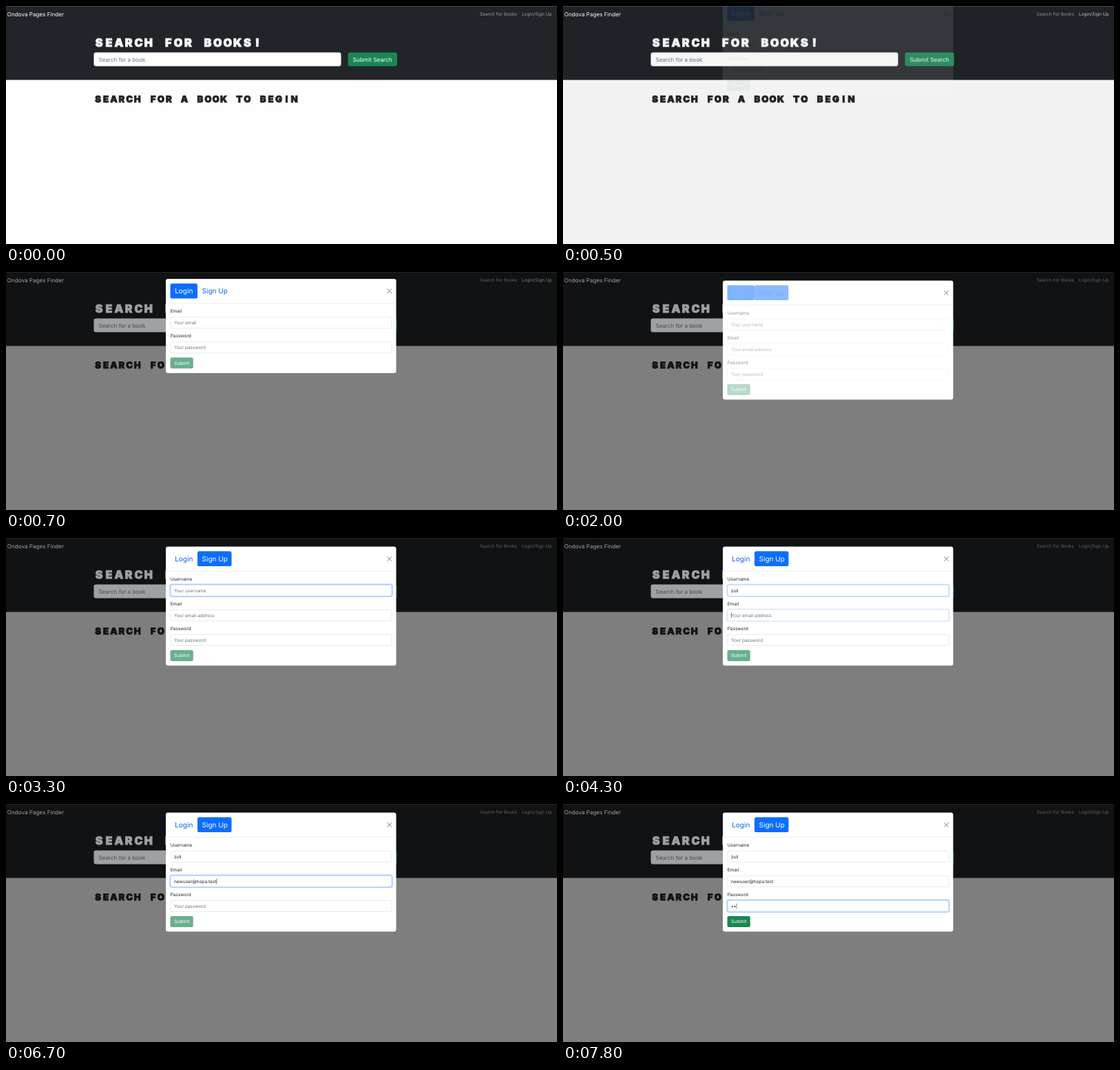
Animation, 800 px wide and 346 px high, one loop 8 s. Source, as an HTML page:

```html
<!DOCTYPE html>
<html lang="en">
<head>
<meta charset="utf-8">
<title>Book search</title>
<style>
html, body { margin: 0; width: 100%; height: 100%; overflow: hidden; background: #fefefe; }
svg { display: block; width: 100vw; height: 100vh; }
text { font-family: Inter, Roboto, sans-serif; font-size: 6.5px; fill: #212529; text-rendering: geometricPrecision; }
.big { font-size: 8.1px; }
.button { font-size: 8.3px; fill: #fff; }
.link { fill: #fff; }
.tab { font-size: 10px; }
.hint { fill: #6c757d; }
.head { font-weight: 900; text-anchor: middle; stroke-width: .8px; }
.h1 { font-size: 16.2px; fill: #fff; stroke: #fff; }
.h2 { font-size: 13.2px; stroke: #212529; }
</style>
</head>
<body>
<svg viewBox="0 0 800 346">
  <rect width="800" height="346" fill="#fefefe"/>
  <rect width="800" height="107.5" fill="#212529"/>
  <rect width="800" height=".7" fill="#54585c"/>
  <rect x="496.5" y="67.5" width="71.5" height="20" rx="3.2" fill="#198754"/>
  <text class="button" x="503.5" y="80.6">Submit Search</text>
  <text class="head h2" data-pitch="11.4" y="140">SEARCH FOR A BOOK TO BEGIN</text>
  <rect id="backdrop" width="800" height="346"/>
  <g id="lit">
    <text class="big link" x="1.8" y="15.1">Ondova Pages Finder</text>
    <text class="link" x="687.8" y="14.4" fill-opacity=".55">Search For Books</text>
    <text class="link" id="account" x="749" y="14.4">Login/Sign Up</text>
    <text class="head h1" data-pitch="14.35" y="58.8">SEARCH FOR BOOKS!</text>
    <rect x="127.5" y="67.5" width="359" height="20" rx="3.2" fill="#fff"/>
    <text class="big hint" x="134.5" y="80.5">Search for a book</text>
  </g>
  <g id="modal">
    <rect id="box" x="232" y="12.5" width="334.5" rx="3.3" fill="#fff"/>
    <path d="M232 48H566.5" stroke="#dee2e6" stroke-width=".6"/>
    <rect id="loginPill" x="238.5" y="19.3" width="39.5" height="21.7" rx="2.6" fill="#0d6efd"/>
    <rect id="signPill" x="278" y="19.3" width="49.5" height="21.7" rx="2.6" fill="#0d6efd"/>
    <text class="tab" id="loginTab" x="245.2" y="33.7">Login</text>
    <text class="tab" id="signTab" x="284.6" y="33.7">Sign Up</text>
    <path d="M553.4 27l6.4 6.4m0-6.4l-6.4 6.4" stroke="#777" stroke-width="1"/>
    <g id="loginPane"></g>
    <g id="signPane"></g>
  </g>
</svg>
<script>
const $ = id => document.getElementById(id);
const clamp = v => Math.max(0, Math.min(1, v));
const ramp = (t, start, length = 150) => clamp((t - start) / length);
const set = (el, attrs) => { for (const k in attrs) el.setAttribute(k, attrs[k]); };

function add(parent, tag, attrs, text = '') {
  const el = document.createElementNS('http://www.w3.org/2000/svg', tag);
  set(el, attrs);
  el.textContent = text;
  return parent.appendChild(el);
}

// Label, input box, focus ring, content and caret of one form row.
function field(pane, row, label, hint) {
  const y = 68.2 + 36 * row;
  const box = { x: 239, y, width: 321, height: 16.2, rx: 2.2 };
  add(pane, 'text', { x: 238.7, y: y - 6.3 }, label);
  const ring = add(pane, 'rect', { ...box, x: 238.2, y: y - .8, width: 322.6, height: 17.8, rx: 3,
    fill: 'none', stroke: '#0d6efd', 'stroke-opacity': .3, 'stroke-width': 1.7, opacity: 0 });
  const edge = add(pane, 'rect', { ...box, fill: '#fff', stroke: '#ced4da', 'stroke-width': .5 });
  const text = add(pane, 'text', { x: 244, y: y + 10.4, class: 'hint' }, hint);
  const caret = add(pane, 'path', { stroke: '#212529', 'stroke-width': .6 });
  return (value, focus, caretOn) => {
    text.textContent = value || hint;
    set(text, { class: value ? '' : 'hint' });
    set(ring, { opacity: focus });
    set(edge, { stroke: focus > .5 ? '#86b7fe' : '#ced4da' });
    const x = 244.5 + (value ? text.getComputedTextLength() : 0);
    set(caret, { d: `M${x} ${y + 4.4}v7.6`, opacity: caretOn ? 1 : 0 });
  };
}

function submitButton(pane, y) {
  const group = add(pane, 'g', { opacity: .65 });
  add(group, 'rect', { x: 238.5, y, width: 33.3, height: 16, rx: 2.3, fill: '#198754' });
  add(group, 'text', { x: 244, y: y + 10.3, style: 'fill:#fff;font-size:6.8px' }, 'Submit');
  return group;
}

for (const h of document.querySelectorAll('.head')) {
  const xs = [...h.textContent].map((c, i) => 128 + h.dataset.pitch * (i + .5));
  set(h, { x: xs.join(' ') });
}

field($('loginPane'), 0, 'Email', 'Your email');
field($('loginPane'), 1, 'Password', 'Your password');
submitButton($('loginPane'), 126.8);

const user = field($('signPane'), 0, 'Username', 'Your username');
const email = field($('signPane'), 1, 'Email', 'Your email address');
const pass = field($('signPane'), 2, 'Password', 'Your password');
const submit = submitButton($('signPane'), 163);

const NAME = 'zuli', MAIL = 'newuser@hopa.test';
const OPEN = 487, SWITCH = 1930;

// Cubic ease-out curve (0,0,.58,1), solved by bisection.
function easeOut(x) {
  let lo = 0, hi = 1, s = .5;
  for (let i = 0; i < 20; i++) {
    s = (lo + hi) / 2;
    if (3 * s * s * (1 - s) * .58 + s ** 3 < x) lo = s; else hi = s;
  }
  return s * s * (3 - 2 * s);
}

// White at 0, link blue at 1.
function tabColor(k) {
  const c = [11, 99, 229].map(v => Math.round(255 + (v - 255) * k));
  return `fill:rgb(${c})`;
}

const between = (t, a, b) => t >= a && t < b;

function mailCount(t) {
  if (t < 5700) return 0;
  if (t < 5900) return 1;
  const steps = Math.floor((t - 5900) / 100) + 1;
  return Math.min(MAIL.length, 1 + Math.round(steps * 16 / 9));
}

function draw(t) {
  const shown = ramp(t, OPEN);
  set($('backdrop'), { opacity: shown * .5 });
  set($('lit'), { opacity: 1 - .4 * shown });
  set($('account'), { 'fill-opacity': .55 + .2 * (ramp(t, 100) - ramp(t, 1000)) });
  set($('modal'), { opacity: shown,
    transform: `translate(0 ${-21 * (1 - easeOut(ramp(t, OPEN, 300)))})` });

  const tab = ramp(t, SWITCH), signUp = t >= SWITCH;
  set($('box'), { height: signUp ? 173 : 137 });
  set($('loginPill'), { opacity: 1 - tab });
  set($('signPill'), { opacity: tab });
  set($('loginTab'), { style: tabColor(tab) });
  set($('signTab'), { style: tabColor(1 - tab) });
  set($('loginPane'), { opacity: signUp ? 0 : 1 });
  set($('signPane'), { opacity: tab });

  const toUser = ramp(t, 2740), toMail = ramp(t, 4240), toPass = ramp(t, 6740);
  const typed = Math.max(0, Math.floor((t - 3300) / 100));
  user(NAME.slice(0, typed), toUser - toMail,
    between(t, 2800, 3300) || between(t, 3400, 4300));
  email(MAIL.slice(0, mailCount(t)), toMail - toPass,
    between(t, 4300, 4800) || between(t, 5300, 6800));
  pass('•'.repeat((t >= 7500) + (t >= 7800)), toPass,
    between(t, 6800, 7300) || t >= 7500);
  set(submit, { opacity: .65 + .35 * ramp(t, 7450) });
}

function tick() {
  draw(performance.now() % 8000);
  requestAnimationFrame(tick);
}
tick();
</script>
</body>
</html>
```
